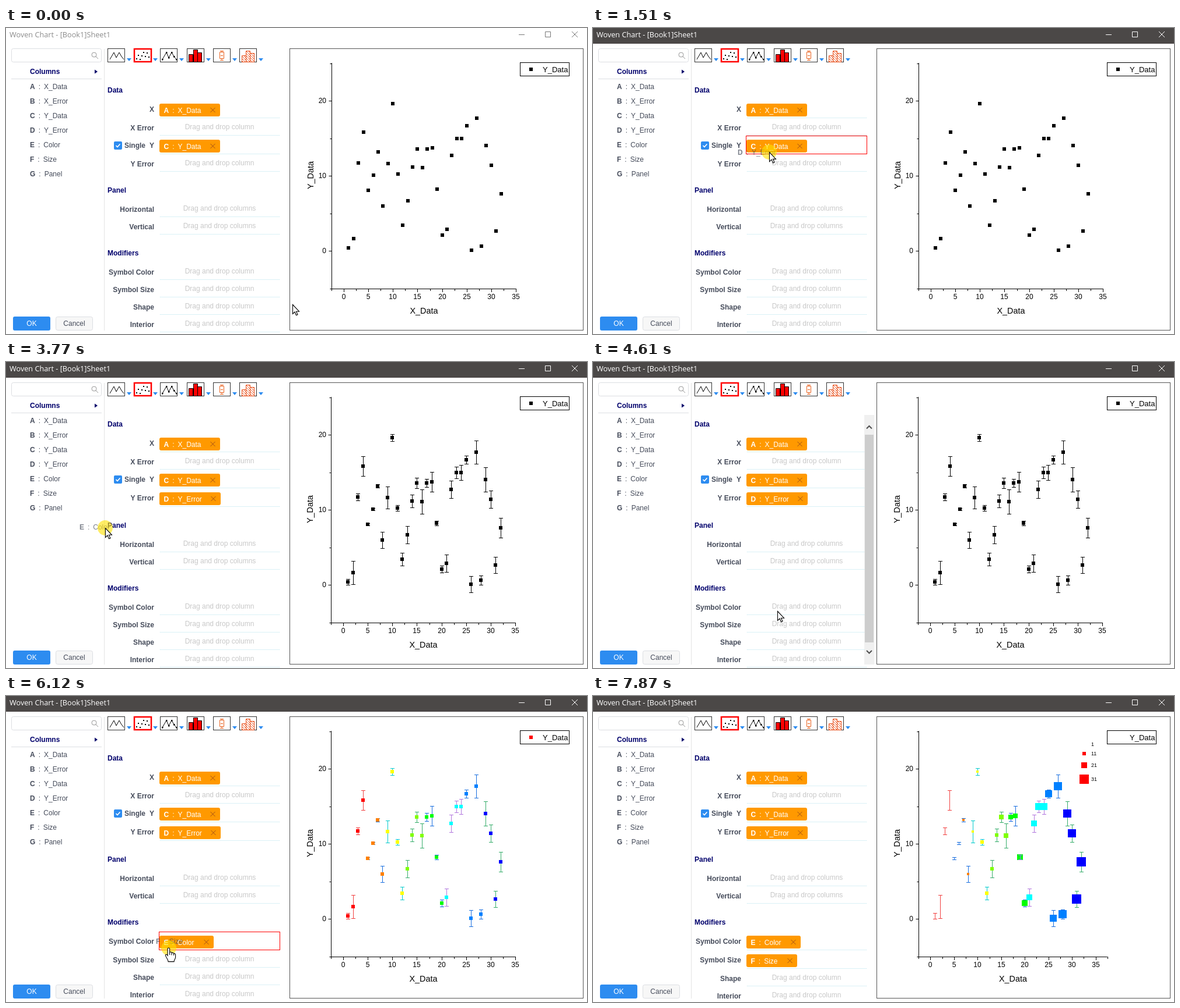
Animation, 996 px wide and 526 px high, one loop 8000 ms. Source, as an HTML page:

```html
<!DOCTYPE html>
<html lang="en">
<head>
<meta charset="utf-8">
<title>Woven Chart</title>
<style>
html, body { margin: 0; width: 100%; height: 100%; overflow: hidden; background: #fff; }
svg { display: block; width: 100vw; height: 100vh; font: 12px "Liberation Sans", Arial, sans-serif; fill: #464c5b; }
.bold { font-weight: bold; }
.head { font-weight: bold; fill: #00006b; }
.hint { fill: #c8c8c8; }
.white { fill: #fff; }
.black { fill: #000; }
.title { font: 12.7px "Open Sans", "Noto Sans", sans-serif; }
.axis { font-size: 14.4px; fill: #000; }
.legend { font-size: 13px; fill: #000; }
.small { font-size: 9px; fill: #000; }
</style>
</head>
<body>
<svg id="stage" viewBox="0 0 996 526"></svg>
<script>
const LOOP = 8000;
const COLUMNS = { A: 'X_Data', B: 'X_Error', C: 'Y_Data', D: 'Y_Error', E: 'Color', F: 'Size', G: 'Panel' };
const KEYS = Object.keys(COLUMNS);

const START = [491, 475];
const MOVES = [
  { from: 70, to: 700, at: [126, 161] },
  { from: 700, to: 870, at: [95, 175] },
  { from: 950, to: 1510, at: [302, 213] },
  { from: 1510, to: 1630, at: [304, 228] },
  { from: 2700, to: 2940, at: [104, 218] },
  { from: 2940, to: 3440, at: [85, 202] },
  { from: 3510, to: 4220, at: [316, 428] },
  { from: 4720, to: 5200, at: [63, 237] },
  { from: 5240, to: 5990, at: [236, 350] },
  { from: 6050, to: 6120, at: [279, 433] },
  { from: 6120, to: 6380, at: [300, 463] },
  { from: 7610, to: 7860, at: [312, 530] }
];
const DRAGS = [
  { key: 'D', field: 'Y Error', press: 950, release: 2000, commit: 2250, redraw: 2320 },
  { key: 'E', field: 'Symbol Color', press: 3510, release: 4420, commit: 4650, redraw: 4700 },
  { key: 'F', field: 'Symbol Size', press: 5240, release: 6740, commit: 6940, redraw: 7050, hand: true }
];

// The plotted Y_Data column
const VALUES = [.4, 1.6, 11.7, 15.8, 8.1, 10.1, 13.2, 6, 11.6, 19.6, 10.2, 3.4, 6.7, 11.2, 13.6, 11.1,
  13.6, 13.7, 8.2, 2.1, 2.9, 12.7, 15, 15, 16.7, .1, 17.7, .6, 14, 11.4, 2.6, 7.6];
const FILLS = ['#f00', '#ff8000', '#ff0', '#80ff00', '#0f0', '#0ff', '#0080ff', '#00f'];
const [RED, BLUE, TEAL, GREEN, PURPLE] = ['#f14040', '#1a6fdf', '#00cbcc', '#37ad6b', '#b177de'];
const BARS = [RED, BLUE, TEAL, GREEN, BLUE, PURPLE, BLUE, GREEN];

const stage = document.getElementById('stage');
const pen = document.createElement('canvas').getContext('2d');
pen.font = '12px "Liberation Sans", Arial, sans-serif';

const noise = n => Math.abs(Math.sin(n * 78.233) * 43758.5453) % 1;
const errorOf = n => 1 + Math.round(20 * noise(n));
const sizeOf = n => 2 * Math.floor((n + 1) / 4);
const heightOf = v => 383 - 12.9 * v;

const rect = (x, y, w, h, fill, stroke = 'none', r = 0, sw = 1) =>
  `<rect x="${x}" y="${y}" width="${w}" height="${h}" rx="${r}" fill="${fill}" stroke="${stroke}" stroke-width="${sw}"/>`;
const path = (d, stroke, sw = 1, fill = 'none', more = '') =>
  `<path d="${d}" stroke="${stroke}" stroke-width="${sw}" fill="${fill}" ${more}/>`;
const text = (x, y, str, cls = '', anchor = 'start', more = '') =>
  `<text x="${x}" y="${y + 4}" class="${cls}" text-anchor="${anchor}" ${more}>${str}</text>`;
const square = (x, y, size, fill) => rect(x - size / 2, y - size / 2, size, size, fill);
const columnText = (x, y, key, cls = '', more = '') =>
  text(x, y, `<tspan class="bold">${key}</tspan><tspan dx="6">:</tspan><tspan dx="6">${COLUMNS[key]}</tspan>`, cls, 'start', more);
const rowY = key => 101 + 25 * KEYS.indexOf(key);

function pointerAt(t) {
  let [x, y] = START;
  for (const { from, to, at } of MOVES) {
    const k = Math.min(1, Math.max(0, (t - from) / (to - from)));
    x += (at[0] - x) * k;
    y += (at[1] - y) * k;
  }
  return [x, y];
}

function titleBar(active) {
  const ink = active ? '#fff' : '#777';
  return rect(0, 0, 996, 27, active ? '#4b4847' : '#fff') +
    text(6, 12, 'Woven Chart - [Book1]Sheet1', 'title', 'start', `style="fill:${active ? '#fff' : '#8c8c8c'}"`) +
    path('M879 11.5h10M924.5 6.5h9v9h-9zM970 6l10 10M980 6l-10 10', ink);
}

function sidebar(hover) {
  const rows = KEYS.map((key, i) =>
    (i === hover ? rect(9, rowY(key) - 13, 155, 25, '#add8e6', 'none', 3) : '') + columnText(41, rowY(key), key));
  return rect(9.5, 35.5, 154, 23, '#fff', '#dcdee2', 3) +
    path('M155 46a4 4 0 1 1-8 0a4 4 0 1 1 8 0M154 49l4 4', '#999') +
    text(41, 75, 'Columns', 'head') + path('M152 71.5v7l5-3.5z', 'none', 0, '#00006b') +
    path('M9 87.5h155', '#dcdee2') + rows.join('') + path('M168.5 36v484', '#e4e4e4') +
    rect(12, 496, 64, 24, '#2d8cf0', 'none', 3) + text(44, 508, 'OK', 'white', 'middle') +
    rect(85.5, 496.5, 63, 23, '#f7f7f7', '#dcdee2', 3) + text(117, 508, 'Cancel', '', 'middle');
}

function toolbar() {
  const zigzag = 'l7-12 4 9 5-9 4 7 4 5';
  const bars = (x, tall) => `M${x} 58.5v${-tall}h7v${tall}z`;
  const hatch = '<pattern id="hatch" width="4" height="4" patternUnits="userSpaceOnUse">' +
    '<path d="M-1-1l6 6M-1 3l2 2M3-1l2 2" stroke="#e8501c"/></pattern>';
  let out = hatch;
  for (let i = 0; i < 6; i++) {
    const x = 174 + Math.round(45.2 * i);
    out += i === 1 ? rect(x + 1, 36, 29, 22, '#fff', '#f00', 0, 2.5) : rect(x + .5, 35.5, 29, 23, '#fff', '#333');
    out += path(`M${x + 33} 52h8l-4 5z`, 'none', 0, '#2d8cf0');
  }
  for (let i = 0; i < 8; i++) out += square(224 + 3 * i, 42 + (i * 7 + 11) % 13, 2, '#000');
  const dotted = '<marker id="dot" markerWidth="3" markerHeight="3" refX="1.5" refY="1.5"><path d="M0 0h3v3H0z" fill="#000"/></marker>';
  return out + dotted + path(`M178 54${zigzag}`, '#000') +
    path(`M268 54${zigzag}`, '#000', 1, 'none', 'marker-start="url(#dot)" marker-mid="url(#dot)" marker-end="url(#dot)"') +
    path(bars(313.5, 13) + bars(321.5, 21) + bars(328.5, 16), '#000', 1, '#f00') +
    path('M366.5 41.5h7v11h-7zM367 39.5h6M370 39.5v2M370 52.5v3M367 55.5h6M368 47.5h4', '#e8601c') +
    path(bars(404.5, 11) + bars(411.5, 19) + bars(418.5, 15), '#e8501c', 1, 'url(#hatch)');
}

function chip(y, key) {
  const w = Math.round(64 + pen.measureText(COLUMNS[key]).width), cx = 263 + w - 12.5;
  return rect(263, y, w, 22, '#f90', 'none', 3) + columnText(270.5, y + 12, key, 'white') +
    path(`M${cx - 4} ${y + 7}l8 8m0-8l-8 8`, '#a3501a');
}

function form(chips, drag, px, py) {
  const sections = [
    ['Data', 'column', ['X', 'X Error', 'Y', 'Y Error']],
    ['Panel', 'columns', ['Horizontal', 'Vertical']],
    ['Modifiers', 'column', ['Symbol Color', 'Symbol Size', 'Shape', 'Interior']]
  ];
  let y = 122, out = '', target = '';
  for (const [heading, noun, labels] of sections) {
    out += text(174, y - 15, heading, 'head');
    for (const label of labels) {
      const key = chips[label], height = key ? 32 : 30;
      out += text(254, y + 18, label, 'bold', 'end');
      if (label === 'Y') {
        out += text(203, y + 18, 'Single', 'bold') + rect(185, y + 11, 14, 14, '#2d8cf0', 'none', 2) +
          path(`M188.5 ${y + 18}l2.5 2.5 4.5-5`, '#fff', 1.7);
      }
      out += key ? chip(y + 8, key) : text(366, y + 16, `Drag and drop ${noun}`, 'hint', 'middle');
      out += path(`M264 ${y + height + .5}h205`, '#b5e3ee', 1, 'none', 'stroke-dasharray="1 1"');
      if (drag && px > 262 && px < 470 && py >= y && py < y + height)
        target = rect(262.5, y + 1.5, 207, height - 1, 'none', '#f00');
      y += height;
    }
    y += 48;
  }
  return out + target;
}

const scrollbar = () => rect(465, 91, 17, 429, '#f0f0f0') + rect(466, 125, 15, 357, '#cdcdcd') +
  path('M469 114.5l4.5-4.5 4.5 4.5M469 496l4.5 4.5 4.5-4.5', '#505050', 2);

function graph(bars, colors, sizes) {
  const left = bars && !sizes ? 557.5 : 558.5, right = sizes ? 881.5 : left + 316;
  const origin = sizes ? 578.4 : bars ? 578 : 579, unit = sizes ? 8.09 : 8.43;
  let ticks = `M${left} 60V448.5H${right}`, out = '', marks = '';
  for (let v = -2.5; origin + v * unit < right + 1; v += 2.5) {
    const x = Math.round(origin + v * unit), major = v % 5 === 0;
    ticks += `M${x + .5} 448v${major ? 6 : 4}`;
    if (major) out += text(x, 462, v, 'black', 'middle');
  }
  for (let v = -5; v <= 25; v += 5) {
    const y = Math.round(heightOf(v)), major = v % 10 === 0;
    ticks += `M${left} ${y + .5}h${major ? -5 : -3}`;
    if (major) out += text(549, y, v, 'black', 'end');
  }
  VALUES.forEach((value, i) => {
    const n = i + 1, x = Math.round(origin + n * unit), y = Math.round(heightOf(value));
    const group = i >> 2, e = errorOf(n), size = sizes ? sizeOf(n) : 6;
    const hidden = sizes && e < size / 2;
    const bar = bars ? path(`M${x - 3} ${y - e + .5}h7m0 ${2 * e}h-7m3.5 0v${-2 * e}`,
      hidden ? '#8080ff' : colors ? BARS[group] : '#000') : '';
    const mark = size > 2 ? square(x, y, size, colors ? FILLS[group] : '#000') : '';
    marks += hidden ? mark + bar : bar + mark;
  });
  const mid = (left + right) / 2, tx = bars ? 522 : 523;
  out += text(mid, 487, 'X_Data', 'axis', 'middle') +
    text(tx, 253, 'Y_Data', 'axis', 'middle', `transform="rotate(-90 ${tx} 253)"`) +
    rect(881.5, 59.5, 84, 23, '#fff', '#000') + text(920, 72, 'Y_Data', 'legend');
  if (sizes) {
    let y = 83;
    for (let n = 1; n <= 31; n += 10) {
      out += square(842, y, sizeOf(n), '#f00') + text(854, y - 1, n, 'small');
      y += 12 + 4 * Math.ceil(n / 10);
    }
  } else out += square(900, 71, 6, colors ? '#f00' : '#000');
  return rect(486.5, 35.5, 503, 484, '#fff', '#555') + path(ticks, '#000') + out + marks;
}

function pointer(x, y, hand) {
  const shape = hand
    ? 'M-2 1.5C-2-.7 1.5-.7 1.5 1.5V8C2 6.5 5 6.5 5 8.5 6 7.5 8.5 8 8.5 10 9.5 9 11.5 9.5 11.5 11.5V16C11.5 19 9 20 9 23.5H-1C-1 20-4 17-5.5 13.5-6.5 11-4 10-2 13ZM1.5 8v4M5 8.5v4M8.5 10v3'
    : 'M.5.5V16.5L4 13 6.5 18.8 9 17.8 6.5 12.2H11.5Z';
  return path(shape, '#000', 1.1, '#fff', `transform="translate(${x} ${y})"`);
}

function ghost({ key, press }, x, y) {
  const [gripX, gripY] = pointerAt(press);
  return columnText(41 + x - gripX, rowY(key) + y - gripY, key, '', 'opacity=".7"') +
    `<circle cx="${x}" cy="${y}" r="13" fill="#ffe100" opacity=".6"/>`;
}

function render(t) {
  const [x, y] = pointerAt(t);
  const drag = DRAGS.find(d => t >= d.press && t < d.release);
  const overList = !drag && x >= 9 && x < 164 && y >= 88 && y < 263;
  const overForm = !drag && x > 168 && x < 482 && y < 526;
  const chips = { X: 'A', Y: 'C' };
  for (const d of DRAGS) if (t >= d.commit) chips[d.field] = d.key;

  stage.innerHTML = titleBar(t >= DRAGS[0].press) +
    sidebar(overList ? Math.floor((y - 88) / 25) : -1) + toolbar() +
    form(chips, drag, x, y) + (overForm ? scrollbar() : '') +
    graph(...DRAGS.map(d => t >= d.redraw)) +
    (drag ? ghost(drag, x, y) : '') +
    pointer(x, y, overList || (drag && drag.hand));
}

const start = performance.now();
function tick() {
  render((performance.now() - start) % LOOP);
  requestAnimationFrame(tick);
}
tick();
</script>
</body>
</html>
```
